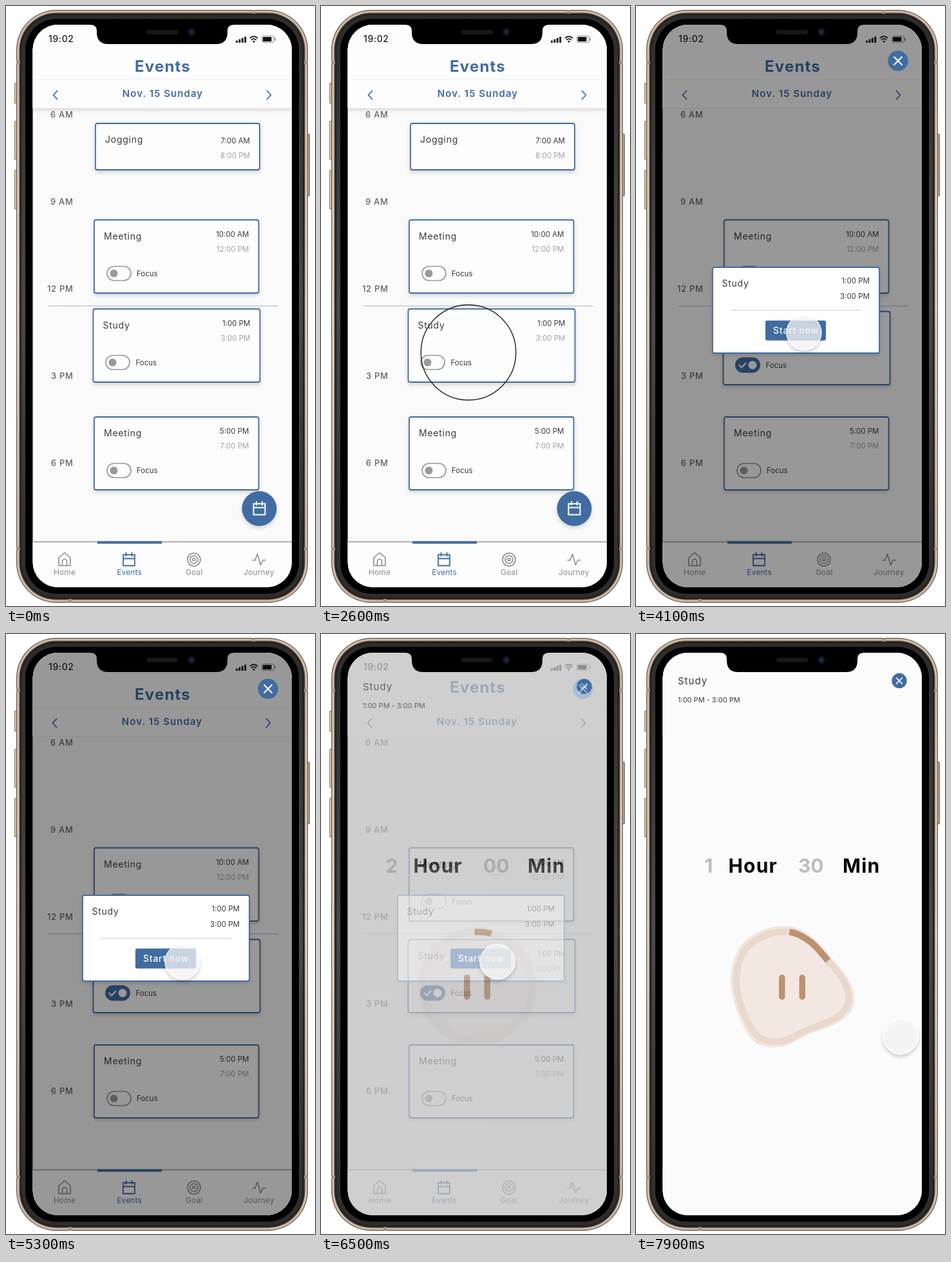
Write an HTML page that moves like this. It is 480 by 930 pixels and loops after 8000 ms.

```html
<!DOCTYPE html>
<html lang="en">
<head>
<meta charset="utf-8">
<title>Event focus timer</title>
<style>
html, body { margin: 0; width: 100%; height: 100%; overflow: hidden; background: #fff; }
svg { display: block; width: 480px; height: 930px; }
text { font-family: Inter, "Open Sans", sans-serif; white-space: pre; }
</style>
</head>
<body>
<svg id="stage" viewBox="0 0 480 930"></svg>
<script>
const BLUE = '#416ca2', INK = '#3b3b3b', GREY = '#a2a2a2', BROWN = '#bd9172';
const stage = document.getElementById('stage');

// y is the middle of the capitals
function label(x, y, str, size, o = {}) {
  const { fill = INK, weight = 400, ls = 0, anchor = 'start' } = o;
  return `<text x="${x}" y="${y + size * 0.36}" font-size="${size}" font-weight="${weight}"
    letter-spacing="${ls}" text-anchor="${anchor}" fill="${fill}">${str}</text>`;
}
function box(x, y, w, h, r, fill, extra = '') {
  return `<rect x="${x}" y="${y}" width="${w}" height="${h}" rx="${r}" fill="${fill}" ${extra}/>`;
}
function disc(x, y, r, fill, extra = '') {
  return `<circle cx="${x}" cy="${y}" r="${r}" fill="${fill}" ${extra}/>`;
}
function line(d, stroke, width = 1.6) {
  return `<path d="${d}" fill="none" stroke="${stroke}" stroke-width="${width}" stroke-linecap="round" stroke-linejoin="round"/>`;
}
function group(id, body, extra = '') {
  return `<g id="${id}" ${extra}>${body}</g>`;
}

function toggleOff(x, y) {
  return box(x - 18.5, y - 11, 37, 22, 11, 'none', 'stroke="#999" stroke-width="1.7"') + disc(x - 8, y, 6, '#999');
}
function toggleOn(x, y) {
  return box(x - 19.5, y - 12, 39, 24, 12, BLUE) + disc(x + 7.5, y, 6.5, '#fff') +
    line(`M${x - 13} ${y}l3.5 4l6.5 -7`, '#fff', 2);
}
function card(x, y, w, h, name, from, to, toggle) {
  const end = x + w - 15, top = y + (toggle ? 22 : 27);
  return box(x, y, w, h, 3, '#fdfdfd', `stroke="${BLUE}" stroke-width="1.8" filter="url(#soft)"`) +
    label(x + 15, y + 25, name, 14, { ls: 0.75 }) +
    label(end, top, from, 11.5, { anchor: 'end' }) +
    label(end, top + 23, to, 11.5, { anchor: 'end', fill: GREY }) +
    (toggle ? toggle + label(x + 66, y + 83, 'Focus', 11.5) : '');
}
function calendar(x, y, c, w = 1.8) {
  return line(`M${x - 9} ${y - 7}h18v17h-18zM${x - 9} ${y - 1}h18M${x - 4.5} ${y - 10}v5M${x + 4.5} ${y - 10}v5`, c, w);
}
function close(x, y, r, fill) {
  const k = r * 0.38;
  return disc(x, y, r, fill) + line(`M${x - k} ${y - k}l${2 * k} ${2 * k}M${x + k} ${y - k}l${-2 * k} ${2 * k}`, '#fff', r * 0.14);
}

function hours() {
  return ['6 AM', '9 AM', '12 PM', '3 PM', '6 PM']
    .map((s, i) => label(104.5, 168 + i * 135, s, 13, { fill: '#636363', weight: 500, ls: 0.7, anchor: 'end' })).join('');
}
function header() {
  return group('headShade', box(41, 28, 403, 130, 0, '#fdfdfd', 'filter="url(#soft)"')) +
    box(41, 28, 403, 130, 0, '#fdfdfd') + line('M42 158.500H443', '#ececec', 1) +
    line('M42 114H443', '#f0f0f0', 1) +
    label(66, 51, '19:02', 14, { weight: 500, ls: 0.6, fill: '#222' }) +
    [0, 1, 2, 3].map(i => box(357 + i * 4.4, 53.5 - i * 2, 3, 3.5 + i * 2, 0.7, '#222')).join('') +
    line('M379.5 49.5q5.5 -4.5 11 0M381.7 52.2q3.3 -2.7 6.6 0', '#222', 1.8) + disc(385, 55, 1.6, '#222') +
    box(397.5, 46.5, 19, 10, 2.5, 'none', 'stroke="#888"') + box(399, 48, 13.5, 7, 1, '#111') + box(417.5, 49.5, 1.5, 4, 0.7, '#888') +
    group('title', label(243.5, 93, 'Events', 24, { fill: BLUE, weight: 700, ls: 1.2, anchor: 'middle' })) +
    group('dateRow', label(243.5, 135.5, 'Nov. 15 Sunday', 15, { fill: BLUE, weight: 600, ls: 1.05, anchor: 'middle' }) +
      line('M79.5 131.5l-6 6.5l6 6.5M405.5 131.5l6 6.5l-6 6.5', BLUE, 1.8));
}
function nav() {
  const c = '#8c8c8c';
  const names = ['Home', 'Events', 'Goal', 'Journey'];
  return box(41, 830, 403, 73, 0, '#fdfdfd') + line('M41 830.5H444', '#959595', 1.5) + box(142, 829.5, 100, 4, 0, BLUE) +
    line('M82 855l9 -7.5l9 7.5v12.5h-18zM87.5 867v-6a3.5 3.5 0 0 1 7 0v6', c) +
    calendar(191, 857.5, BLUE) +
    [10, 6, 2].map(r => disc(292, 858, r, 'none', `stroke="${c}" stroke-width="1.6"`)).join('') +
    line('M383 859h4l3.5 -9.5l5 17l3.5 -7.5h4', c) +
    names.map((s, i) => label(91 + i * 100.6, 878, s, 12, { fill: i === 1 ? BLUE : c, anchor: 'middle', ls: 0.15 })).join('');
}
function modal() {
  return group('plate', box(119, 405, 259, 133, 3, '#fff', 'filter="url(#soft)"')) +
    box(119, 405, 259, 133, 3, 'none', `stroke="${BLUE}" stroke-width="1.8"`) +
    label(133.5, 429.5, 'Study', 14, { ls: 0.75 }) +
    label(363, 426, '1:00 PM', 11.5, { anchor: 'end' }) + label(363, 449.5, '3:00 PM', 11.5, { anchor: 'end' }) +
    line('M147 471.5H350', '#d0d0d0', 1) +
    group('start', box(201, 487.5, 94, 31, 3, BLUE) +
      label(248.5, 503, 'Start now', 14, { fill: '#fff', weight: 500, ls: 0.75, anchor: 'middle' }));
}
function count(id, h, m) {
  const o = { fill: '#bdbdbd', weight: 700 };
  return group(id, label(119.5, 359.5, h, 30, { ...o, anchor: 'end' }) + label(252, 359.5, m, 30, o));
}
function timer() {
  const big = { fill: '#050505', weight: 700, ls: 1.2 };
  return box(41, 28, 403, 875, 0, '#fbfbfb') +
    group('focusHead', label(65, 73, 'Study', 15, { ls: 1 }) + label(65, 102.5, '1:00 PM - 3:00 PM', 11) + close(409, 72.5, 11.7, BLUE)) +
    label(143.5, 359.5, 'Hour', 30, big) + label(321, 359.5, 'Min', 30, big) +
    count('countA', '2', '00') + count('countB', '1', '30') +
    group('dial', '<path id="blob" fill="#f1e5dd"/><path id="band" fill="#f3e8e1" stroke="#e8d8cd" stroke-width="10"/>') +
    group('marks', `<path id="arc" fill="none" stroke="${BROWN}" stroke-width="10" pathLength="100"/>` +
      box(222, 528, 9.5, 39, 4.7, BROWN) + box(253.5, 528, 9.5, 39, 4.7, BROWN));
}
function phone() {
  const shells = [[0, '#65564a'], [1.2, 'url(#gold)'], [4.5, '#4a4039'], [6, '#201e1c'], [8, 'url(#steel)'], [14, '#000']];
  const key = (x, y, h) => box(x, y, 5, h, 1.5, '#8d7864') + box(x + 1, y + 1, 2, h - 2, 1, '#d6c2ad');
  const bands = [[16, 85, 6, 5], [463, 85, 6, 5], [16, 839, 6, 5], [463, 839, 6, 5], [382, 6, 5, 6], [97, 919, 5, 6]];
  return key(13, 119, 32) + key(13, 178, 60) + key(13, 254, 61) + key(467, 198, 97) +
    shells.map(([d, c]) => box(16 + d, 6 + d, 453 - 2 * d, 919 - 2 * d, 62 - d, c)).join('') +
    bands.map(b => box(...b, 0, '#a48e78')).join('');
}
function notch() {
  return '<path d="M130 27H355V29Q344 29 344 38V41Q344 59 326 59H159Q141 59 141 41V38Q141 29 130 29Z"/>' +
    box(218, 37, 49, 7, 3.5, '#161616') + disc(288, 40, 6, '#10131f') + disc(288, 40, 3, '#1d2849');
}

stage.innerHTML = `<defs>
  <linearGradient id="gold" x2="0" y2="1"><stop stop-color="#cdb9a5"/><stop offset=".5" stop-color="#e6d8c9"/><stop offset="1" stop-color="#cdb9a5"/></linearGradient>
  <linearGradient id="steel" x2="0" y2="1"><stop stop-color="#2c2c2b"/><stop offset=".5" stop-color="#4a4a48"/><stop offset="1" stop-color="#2c2c2b"/></linearGradient>
  <filter id="soft" x="-10%" y="-20%" width="120%" height="150%"><feDropShadow dx="0" dy="3" stdDeviation="3" flood-opacity=".16"/></filter>
  <filter id="lift" x="-30%" y="-30%" width="160%" height="170%"><feDropShadow dx="0" dy="4" stdDeviation="2.5" flood-opacity=".22"/></filter>
  <clipPath id="glass"><rect x="41.5" y="29" width="402.5" height="872" rx="39"/></clipPath>
</defs>` + phone() + group('screen',
  box(41, 28, 403, 875, 0, '#fafafa') + hours() +
  group('jog', card(139, 182, 255, 72, 'Jogging', '7:00 AM', '8:00 PM')) +
  card(137, 331.5, 255.5, 113.5, 'Meeting', '10:00 AM', '12:00 PM', toggleOff(175.5, 414.5)) +
  line('M66 465H422', '#a8b4d0', 1.2) +
  group('study', card(135.5, 469.5, 259, 113.5, 'Study', '1:00 PM', '3:00 PM',
    group('off', toggleOff(173.5, 552.5)) + group('on', toggleOn(173.5, 552.5)))) +
  card(137, 637, 255.5, 113, 'Meeting', '5:00 PM', '7:00 PM', toggleOff(175.5, 720)) +
  header() + nav() +
  group('add', disc(393.5, 779, 27, BLUE, 'filter="url(#soft)"') + calendar(393.5, 778.5, '#fff', 2)) +
  group('dim', box(41, 28, 403, 875, 0, '#000')) +
  group('modal', modal() + close(407, 85, 15.7, BLUE)) +
  group('timer', timer()) +
  group('cursor', disc(0, 0, 27, '#f8f8f9', 'fill-opacity=".73" stroke="#fff" stroke-opacity=".8" stroke-width="1.5"'), 'filter="url(#lift)"') +
  '<circle id="ring" cx="229" cy="537" fill="none" stroke="#222" stroke-width="1.4"/>',
  'clip-path="url(#glass)"') + notch();

const el = {};
stage.querySelectorAll('[id]').forEach(n => { el[n.id] = n; });
const set = (id, name, v) => el[id].setAttribute(name, v);
const fade = (id, v) => set(id, 'opacity', v.toFixed(3));
const move = (id, x, y) => set(id, 'transform', `translate(${x} ${y})`);
const ramp = (t, a, b) => Math.max(0, Math.min(1, (t - a) / (b - a)));
const ease = (t, a, b) => { const k = ramp(t, a, b); return k * k * (3 - 2 * k); };
const mix = (a, b, k) => a + (b - a) * k;

// Outline of the timer shape, clockwise from the top
const HUB = [243, 546];
const OUTLINE = [[238, 453], [274, 470], [303, 501], [331, 537], [339, 573], [318, 600], [270, 620],
  [224, 640], [184, 632], [159, 590], [147, 536], [160, 487], [195, 460]];

function shape(k, scale) {
  const pts = OUTLINE.map(([x, y]) => {
    const dx = x - HUB[0], dy = y - HUB[1], n = 93 / Math.hypot(dx, dy);
    return [HUB[0] + dx * mix(n, 1, k) * scale, HUB[1] + dy * mix(n, 1, k) * scale];
  });
  const at = i => pts[(i + pts.length) % pts.length];
  let d = `M${at(0)}`;
  pts.forEach((_, i) => {
    const [a, b, c, e] = [at(i - 1), at(i), at(i + 1), at(i + 2)];
    d += `C${b.map((v, j) => v + (c[j] - a[j]) / 6)} ${c.map((v, j) => v - (e[j] - b[j]) / 6)} ${c}`;
  });
  return d + 'Z';
}

// Pointer moves: start, end, target
const MOVES = [[3500, 4120, 261, 506], [4120, 4600, 274, 508], [7150, 7900, 411, 624]];

function draw(t) {
  const open = ease(t, 2800, 3400);
  const go = ease(t, 6200, 6760);
  const late = ease(t, 6300, 6900);
  const change = ease(t, 6800, 7600);

  for (const id of ['jog', 'add', 'off', 'headShade']) fade(id, 1 - open);
  fade('on', Math.min(1, open * 1.6));
  fade('dim', 0.4 * open);
  fade('modal', open);
  fade('plate', 1 - go);
  move('study', 0, 4 * open);
  move('dateRow', -open, 0);
  move('title', 0, -20 * go);

  fade('timer', go);
  fade('dial', late);
  fade('marks', ramp(t, 6300, 6500));
  move('focusHead', 0, 9 * (1 - ease(t, 6450, 6900)));
  fade('countA', 1 - change);
  fade('countB', change);
  set('blob', 'd', shape(change, 1));
  const inner = shape(change, 0.905);
  set('band', 'd', inner);
  set('arc', 'd', inner);
  set('arc', 'stroke-dasharray', `${mix(5, 14.3, ramp(t, 6500, 7900))} 100`);

  let x = 229, y = 537;
  for (const [a, b, tx, ty] of MOVES) {
    const k = ease(t, a, b);
    x = mix(x, tx, k);
    y = mix(y, ty, k);
  }
  move('cursor', x, y);
  fade('cursor', ramp(t, 2650, 2800));
  set('ring', 'r', mix(97, 28, ramp(t, 2500, 2800)));
  fade('ring', t < 2500 ? 0 : 1 - ramp(t, 2700, 2820));
}

function tick(now) {
  draw(now % 8000);
  requestAnimationFrame(tick);
}
draw(0);
requestAnimationFrame(tick);
</script>
</body>
</html>
```
